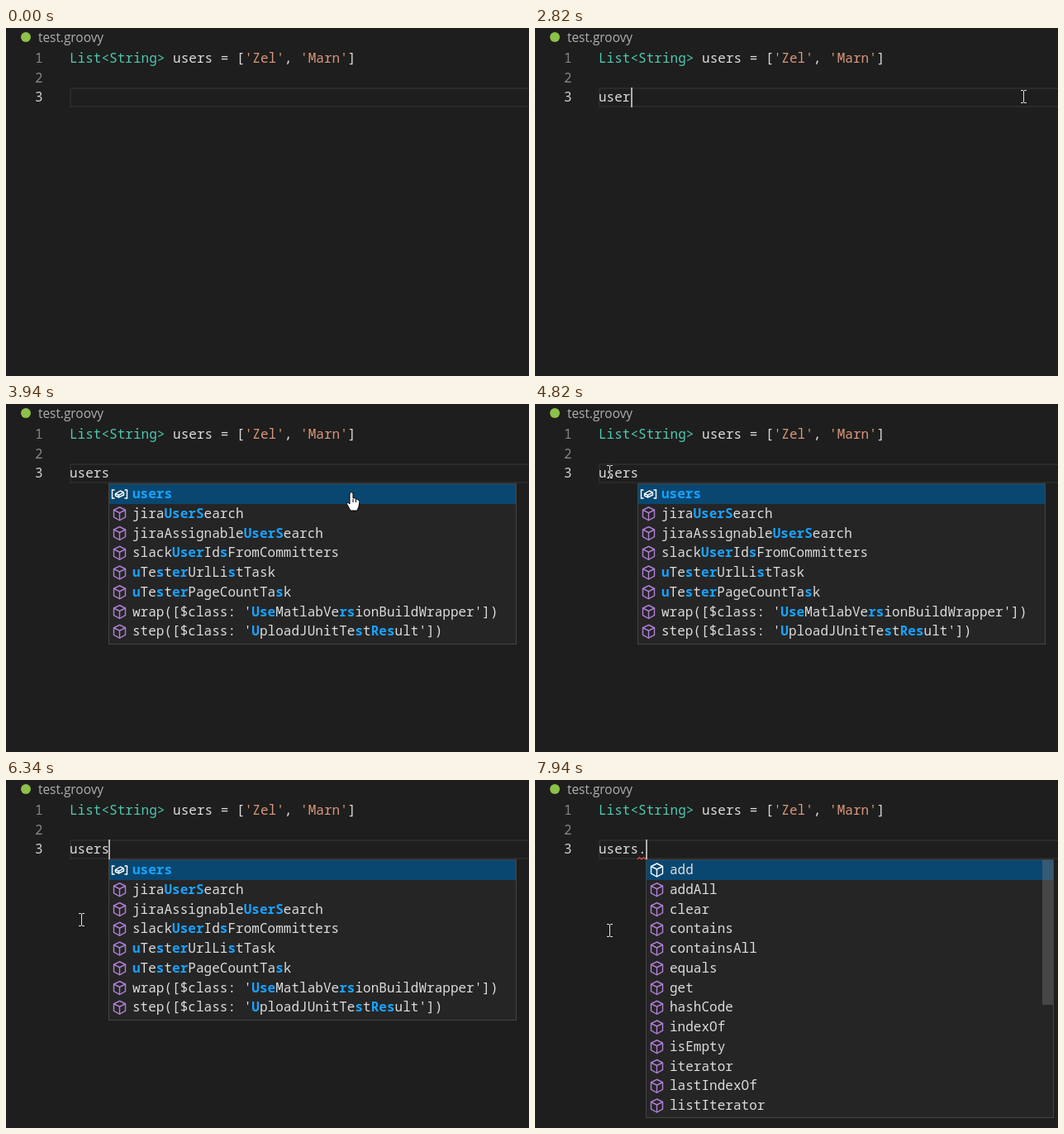
Animation of 633x421 px, one loop 8 s. Source, as an HTML page with a canvas:

```html
<!DOCTYPE html>
<html lang="en">
<head>
<meta charset="utf-8">
<title>Code completion</title>
<style>
html, body { margin: 0; width: 100%; height: 100%; overflow: hidden; background: #1e1e1e; }
canvas { display: block; }
</style>
</head>
<body>
<canvas id="stage" width="633" height="421"></canvas>
<script>
const ctx = document.getElementById('stage').getContext('2d');
const LOOP = 8000, ADV = 9.622, ROW = 23.75, LEFT = 77;
const MONO = '16px "Noto Sans Mono", "DejaVu Sans Mono", monospace';
const FG = '#dcdcdc', TEAL = '#4ec9b0', STRING = '#d7977d', BLUE = '#18a3ff', PURPLE = '#b180d7';

// Caret x after n typed characters
const CARET = [77, 87, 96, 106, 116, 124, 134];
const TYPED = 'users.';
const KEY_TIMES = [2220, 2340, 2620, 2820, 3140, 7540];
const BLINKS = [[500, 1000], [1240, 1740], [2220, 3620], [4120, 4620],
  [5100, 5600], [6100, 6600], [7100, LOOP]];

// Matched letters stand between asterisks
const POPUPS = [
  { from: 3100, to: 3140, x: 116, right: 609, icon: 'variable', rows: [
    '*user*s', 'jira*User*Search', 'slack*User*IdFromEmail', 'slack*User*IdsFromCommitters',
    'conanAdd*User*', '*u*Te*s*t*er*PageCountTask', '*u*Te*s*t*er*UrlListTask',
    '*u*leska*S*cann*er*', '*u*ft*S*c*e*na*r*ioLoad', 'jiraAssignable*User*Search',
    'sv*U*ndeployVirtual*Ser*vice', '*u*nicod*e*_*s*t*r*ing', "wrap([$class: 'Build*User*'])"] },
  { from: 3140, to: 7540, x: 124, right: 618, icon: 'variable', rows: [
    '*users*', 'jira*UserS*earch', 'jiraAssignable*UserS*earch', 'slack*User*Id*s*FromCommitters',
    '*u*Te*s*t*er*UrlLi*s*tTask', '*u*Te*s*t*er*PageCountTa*s*k',
    "wrap([$class: '*Use*MatlabVe*rs*ionBuildWrapper'])",
    "step([$class: '*U*ploadJUnitTe*s*t*Res*ult'])"] },
  { from: 7700, to: LOOP, x: 134, right: 628, icon: 'cube', scroll: true, rows: [
    'add', 'addAll', 'clear', 'contains', 'containsAll', 'equals', 'get', 'hashCode',
    'indexOf', 'isEmpty', 'iterator', 'lastIndexOf', 'listIterator'] }
];

// Pointer keys: time, x, y
const POINTER = [
  [500, 582, 339], [740, 594, 170], [980, 598, 76], [1300, 591, 83],
  [3780, 591, 83], [3940, 418, 107], [4100, 200, 101], [4340, 69, 95],
  [4500, 69, 95], [4660, 78, 77], [4820, 90, 82],
  [6260, 90, 82], [6340, 91, 169], [6580, 90, 182]
];

function rect(x, y, w, h, color) {
  ctx.fillStyle = color;
  ctx.fillRect(x, y, w, h);
}

function frame(x, y, w, h, fill, edge) {
  rect(x, y, w, h, edge);
  rect(x + 1, y + 1, w - 2, h - 2, fill);
}

function path(points, close) {
  ctx.beginPath();
  points.forEach(([x, y]) => ctx.lineTo(x, y));
  if (close) ctx.closePath();
  ctx.stroke();
}

function code(text, x, y, color, bold) {
  ctx.font = (bold ? '700 ' : '500 ') + MONO;
  ctx.letterSpacing = '0.022px';
  ctx.fillStyle = color;
  ctx.fillText(text, x, y);
  return x + text.length * ADV;
}

function runs(parts, x, y) {
  for (const [text, color, bold] of parts) x = code(text, x, y, color, bold);
}

const diamond = (x, y, r) => path([[x - r, y], [x, y - r], [x + r, y], [x, y + r]], true);

const ICONS = {
  cube() {
    path([[0, -8], [7, -4.5], [7, 4], [0, 8], [-7, 4], [-7, -4.5]], true);
    path([[-7, -4.5], [0, -1], [7, -4.5]]);
    path([[0, -1], [0, 8]]);
  },
  variable() {
    for (const s of [-1, 1]) path([[s * 6, -5], [s * 9, -5], [s * 9, 5], [s * 6, 5]]);
    path([[-5, -0.5], [1, -4], [5, -2], [5, 1], [-1, 4], [-5, 2]], true);
    path([[-5, -0.5], [-1, 1.2], [5, -2]]);
    path([[-1, 1.2], [-1, 4]]);
  },
  tree() {
    diamond(-3.5, -3, 4.2);
    diamond(5.5, -0.5, 2.3);
    diamond(5.5, 5.5, 2.3);
    path([[0, -1], [3, -1]]);
    path([[-1, 0], [-1, 5.5], [3, 5.5]]);
  }
};

function icon(name, x, y, color) {
  ctx.save();
  ctx.translate(x, y);
  ctx.strokeStyle = color;
  ctx.lineWidth = 1.4;
  ICONS[name]();
  ctx.restore();
}

function drawPopup(p) {
  const w = p.right - p.x;
  frame(p.x, 96, w, Math.round(p.rows.length * ROW + 4.5), '#252526', '#454545');
  rect(p.x + 1, 97, w - 2, 24, '#094771');
  p.rows.forEach((row, i) => {
    const y = 97 + i * ROW;
    const tree = row.includes('_');
    const name = i === 0 ? p.icon : tree ? 'tree' : 'cube';
    icon(name, p.x + 13.5, y + 12, i === 0 ? '#fff' : tree ? '#ee9d28' : PURPLE);
    const parts = row.split('*').map((s, k) => [s, k % 2 ? BLUE : FG, k % 2 === 1]);
    runs(parts, p.x + 29, Math.round(y + 17));
  });
  if (p.scroll) rect(614, 97, 13, 175, 'rgba(121,121,121,0.4)');
}

function drawEditor() {
  rect(0, 0, 633, 421, '#1e1e1e');
  ctx.fillStyle = '#8dc149';
  ctx.beginPath();
  ctx.arc(24, 11, 6, 0, Math.PI * 2);
  ctx.fill();
  ctx.font = '15.4px "Open Sans", "Noto Sans", sans-serif';
  ctx.letterSpacing = '0px';
  ctx.fillStyle = '#b0b0b0';
  ctx.fillText('test.groovy', 39, 17);

  ctx.strokeStyle = '#2a2a2a';
  ctx.lineWidth = 2;
  ctx.strokeRect(78, 73, 570, 22);
  code('1', 35, 42, '#858585');
  code('2', 35, 66, '#858585');
  code('3', 35, 89, '#cecece');
  runs([['List<String>', TEAL], [' users = [', FG], ["'Zel'", STRING], [', ', FG],
    ["'Marn'", STRING], [']', FG]], LEFT, 42);
}

function drawHover(t) {
  if (t < 5340 || t >= 6300) return;
  ctx.globalAlpha = Math.min(1, 0.3 + (t - 5340) / 170);
  frame(77, 40, 118, 32, '#252526', '#454545');
  runs([['List', TEAL], [' users', FG]], 88, 62);
  ctx.globalAlpha = 1;
}

function drawSquiggle() {
  ctx.strokeStyle = '#f14c4c';
  ctx.lineWidth = 1.2;
  path([[124, 96], [126.5, 93.5], [129, 96], [131.5, 93.5], [134, 96]]);
}

function pointerAt(t) {
  // the pointer is sampled every 80 ms
  const q = Math.max(500, Math.floor((t - 20) / 80) * 80 + 20);
  const i = POINTER.findIndex(k => k[0] > q);
  if (i < 0) return POINTER[POINTER.length - 1].slice(1);
  const [t0, x0, y0] = POINTER[i - 1], [t1, x1, y1] = POINTER[i];
  const u = (q - t0) / (t1 - t0);
  return [Math.round(x0 + (x1 - x0) * u), Math.round(y0 + (y1 - y0) * u)];
}

function drawBeam(x, y) {
  ctx.save();
  ctx.globalCompositeOperation = 'difference';
  rect(x, y - 7, 1, 14, '#fff');
  for (const dy of [-8, 7]) {
    rect(x - 3, y + dy, 3, 1, '#fff');
    rect(x + 1, y + dy, 3, 1, '#fff');
  }
  ctx.restore();
}

function drawHand(x, y) {
  ctx.save();
  ctx.translate(x, y);
  ctx.beginPath();
  ctx.moveTo(-2, 14);
  ctx.lineTo(-2, 1);
  ctx.quadraticCurveTo(0, -2, 2, 1);
  ctx.lineTo(2, 7);
  ctx.quadraticCurveTo(5, 6, 5.5, 8);
  ctx.quadraticCurveTo(8, 7.5, 8.5, 9.5);
  ctx.quadraticCurveTo(10, 9.5, 10, 11);
  ctx.lineTo(9, 17);
  ctx.lineTo(7, 22);
  ctx.lineTo(-1, 22);
  ctx.lineTo(-5.5, 14);
  ctx.quadraticCurveTo(-5, 10.5, -2, 14);
  ctx.closePath();
  ctx.fillStyle = '#fff';
  ctx.strokeStyle = '#000';
  ctx.lineWidth = 1;
  ctx.fill();
  ctx.stroke();
  for (const fx of [2, 5.5]) path([[fx, 8], [fx, 12]]);
  ctx.restore();
}

function draw(t) {
  const count = KEY_TIMES.filter(k => t >= k).length;
  const popup = POPUPS.find(p => t >= p.from && t < p.to);
  drawEditor();
  if (t >= 5340 && t < 6300) rect(LEFT, 72, 48, 24, 'rgba(38,79,120,0.25)');
  code(TYPED.slice(0, count), LEFT, 89, FG);
  if (t >= 7740) drawSquiggle();
  if (popup) drawPopup(popup);
  drawHover(t);
  if (BLINKS.some(([a, b]) => t >= a && t < b)) rect(CARET[count], 72, 2, 24, '#aeafad');
  if (t >= 500) {
    const [x, y] = pointerAt(t);
    const over = popup && x > popup.x && x < popup.right && y > 96 && y < 290;
    (over ? drawHand : drawBeam)(x, y);
  }
}

const start = performance.now();
function tick() {
  draw((performance.now() - start) % LOOP);
  requestAnimationFrame(tick);
}
tick();
</script>
</body>
</html>
```
